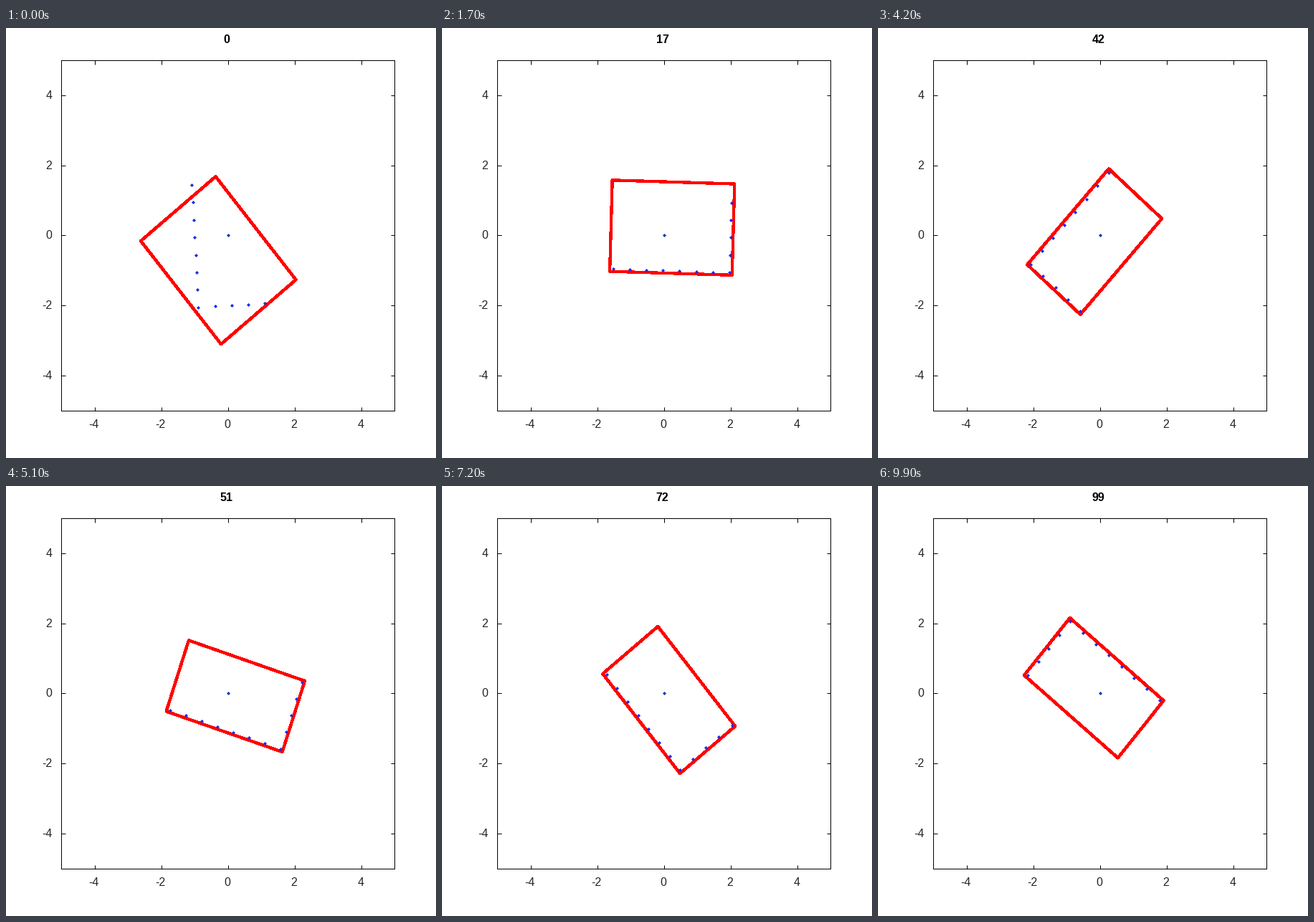
These frames come from a looping animation (600 by 600 pixels, 10 s). A matplotlib script:

```python
import numpy as np
import matplotlib.pyplot as plt
from matplotlib.animation import FuncAnimation
from matplotlib.patches import Polygon

SIZE, DPI, FRAMES = 600, 100, 100
PT = 72 / DPI  # points per pixel
LEFT, RIGHT, TOP, BOTTOM = 77.2, 542.2, 44.9, 533.9

plt.rcParams["font.family"] = "Liberation Sans"
fig = plt.figure(figsize=(SIZE / DPI, SIZE / DPI), dpi=DPI, facecolor="white")
ax = fig.add_axes([LEFT / SIZE, 1 - BOTTOM / SIZE,
                   (RIGHT - LEFT) / SIZE, (BOTTOM - TOP) / SIZE])
ax.set(xlim=(-5, 5), ylim=(-5, 5))
ticks = range(-4, 5, 2)
ax.set_xticks(ticks)
ax.set_yticks(ticks)
ax.tick_params(direction="in", top=True, right=True, labelbottom=False,
               labelleft=False, length=5.5 * PT, width=PT)
for spine in ax.spines.values():
    spine.set_linewidth(PT)


def label(x, y, text, **style):
    """Put text with its baseline at pixel (x, y) from the top left."""
    return fig.text(x / SIZE, 1 - y / SIZE, text, fontsize=16 * PT,
                    va="baseline", **style)


for v in ticks:
    label(308.7 + 46.5 * v, 558, str(v), ha="center", color="#262626")
    label(64.5, 294.4 - 48.9 * v, str(v), ha="right", color="#262626")
title = label(307.5, 21, "0", ha="center", color="black", weight="bold")

# L-shaped scan of two sides, in body coordinates (along, across)
long_side = [(a, -1) for a in np.arange(-2, 1.6, 0.5)]
short_side = [(-2, b) for b in np.arange(-0.5, 1.1, 0.5)]
scan = np.array(long_side + short_side)

dot = dict(ls="", marker="D", ms=3.6 * PT, mew=0, zorder=4)
dots, = ax.plot([], [], color="#1a2ee6", **dot)
ax.plot([0], [0], color="#1040b8", **dot)
box = Polygon(np.zeros((4, 2)), closed=True, fill=False, edgecolor="red",
              linewidth=3.3 * PT, joinstyle="round", antialiased=False,
              zorder=3)
ax.add_patch(box)


def place(points, degrees):
    """Turn body coordinates (along, across) into the plane."""
    c, s = np.cos(np.radians(degrees)), np.sin(np.radians(degrees))
    return np.asarray(points) @ np.array([[c, s], [s, -c]])


def heading(i):
    # starts at 90 degrees; each step is 0.2 degrees larger than the last
    return 90 + 3 * (i + 1) + 0.1 * (i + 1) * (i + 2)


def estimate(i):
    """Corners and angle of the fitted rectangle as it settles on the scan."""
    fast = np.exp(-i / 3)
    slow = np.exp(-(i / 20.3) ** 4)
    a0 = -2.075 - 0.195 * fast
    b0 = -1.07 - 1.055 * fast
    a1 = a0 + 3.67 + 0.134 * fast
    b1 = b0 + 2.135 + 0.767 * slow
    return [(a0, b0), (a1, b0), (a1, b1), (a0, b1)], heading(i) + 36.1 * fast


def update(i):
    dots.set_data(*place(scan, heading(i)).T)
    box.set_xy(place(*estimate(i)))
    title.set_text(str(i))
    return dots, box, title


anim = FuncAnimation(fig, update, frames=FRAMES, interval=100,
                     repeat=True, repeat_delay=0, blit=False)
plt.show()
```
